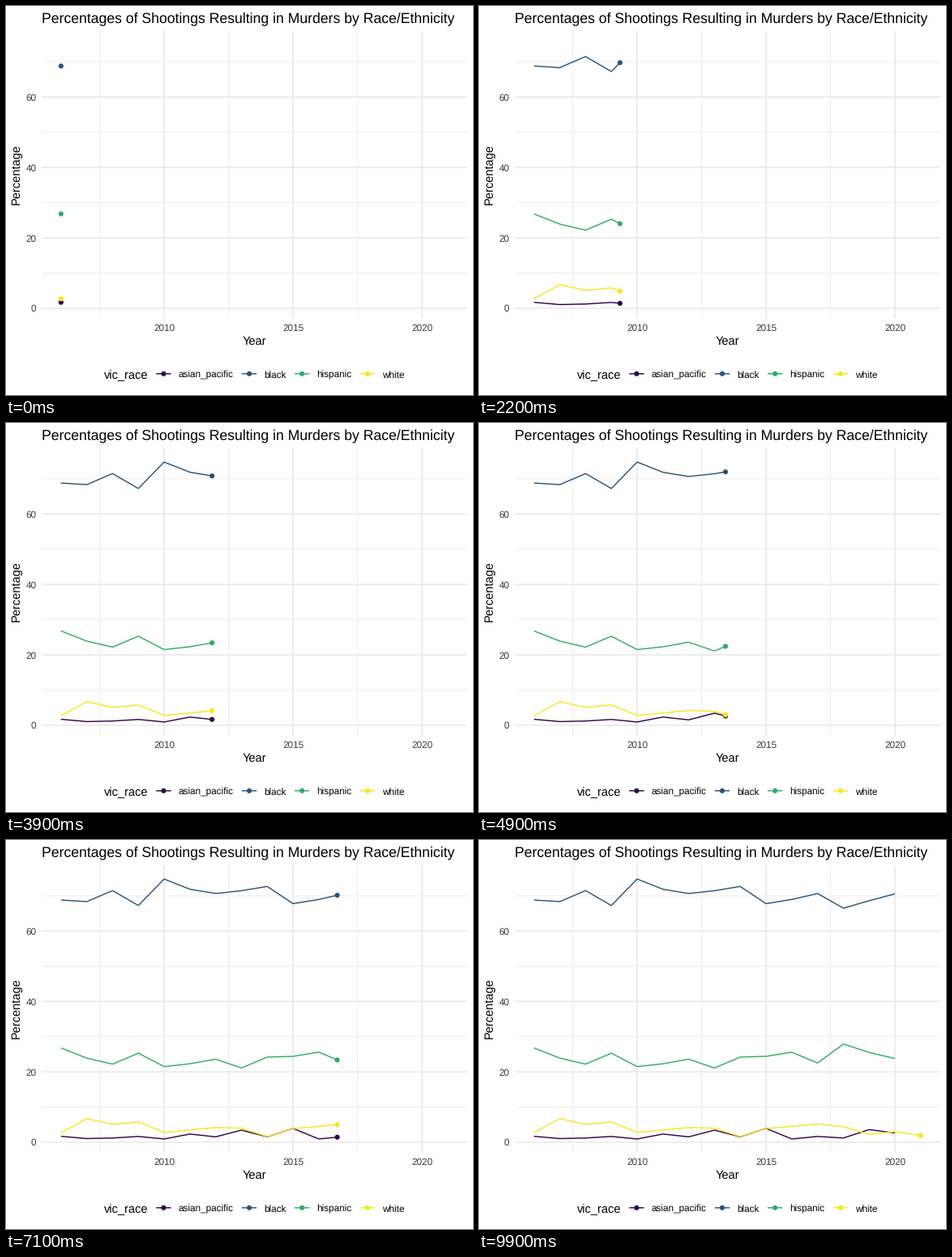
Animation of 576x480 px, one loop 10 s. Source, as a matplotlib script:

```python
import matplotlib.pyplot as plt
import numpy as np
from matplotlib.animation import FuncAnimation
from matplotlib.patches import Circle

plt.rcParams.update({"font.family": "Liberation Sans", "text.hinting": "none"})

W, H, DPI = 576, 480, 96
FRAMES, INTERVAL = 100, 100
PX = 72 / DPI  # points per pixel
LEFT, RIGHT, TOP, BOTTOM = 44.0, 568.67, 30.9, 385.4
GRID, TICK_TEXT = "#E6E6E6", "#3C3C3C"
LINE_W, DOT_R = 1.42, 3.08
TITLE_PT, AXIS_PT, SMALL_PT = 13.2, 11, 8.8

FIRST, LAST = 2006, 2021
years = np.arange(FIRST, LAST + 1)


def shares():
    """Yearly percentages; only one group reaches the last year."""
    white = np.array([2.7, 6.7, 5.1, 5.8, 2.8, 3.5, 4.2, 4.0,
                      1.6, 3.9, 4.5, 5.2, 4.4, 2.3, 3.0, 1.9])
    hispanic = np.array([26.8, 23.9, 22.2, 25.3, 21.5, 22.3, 23.6, 21.1,
                         24.2, 24.4, 25.6, 22.5, 27.9, 25.5, 23.8])
    # A small ripple with a few surge years
    yr = years[:-1]
    asian = (1.3 + 0.4 * np.cos(2 * np.pi * (yr - FIRST) / 2.8)
             + 2.55 * np.isin(yr, (2013, 2015, 2019))
             + 0.95 * np.isin(yr, (2011, 2020)))
    black = 100 - hispanic - white[:-1] - asian
    return {"asian_pacific": asian, "black": black,
            "hispanic": hispanic, "white": white}


COLORS = {"asian_pacific": "#330045", "black": "#26547B",
          "hispanic": "#2FAC67", "white": "#FCE41E"}


def x_of(year):
    return LEFT + (RIGHT - LEFT) * ((year - FIRST) / (LAST - FIRST) / 1.1 + 0.5 / 11)


def y_of(pct):
    return 373.0 - 4.345 * np.asarray(pct)


fig = plt.figure(figsize=(W / DPI, H / DPI), dpi=DPI, facecolor="white")
ax = fig.add_axes([0, 0, 1, 1])
ax.set(xlim=(0, W), ylim=(H, 0))
ax.axis("off")


def stroke(xs, ys, color, width, z):
    return ax.plot(xs, ys, color=color, lw=width * PX, zorder=z, snap=False,
                   solid_capstyle="butt", solid_joinstyle="round")[0]


def dot(x, y, color, z):
    return ax.add_patch(Circle((x, y), DOT_R, fc=color, lw=0, zorder=z))


def label(x, y, text, size, color="black", ha="left", **kw):
    return ax.text(x, y, text, fontsize=size, color=color, ha=ha,
                   va="baseline", **kw)


def h_grid(pct, width, z):
    stroke([LEFT, RIGHT], [y_of(pct)] * 2, GRID, width, z)


def v_grid(year, width, z):
    stroke([x_of(year)] * 2, [TOP, BOTTOM], GRID, width, z)


# Grid and axes
for pct in range(0, 80, 20):
    h_grid(pct + 10, LINE_W / 2, 1)
    h_grid(pct, LINE_W, 2)
    label(37.5, y_of(pct) + 4.3, str(pct), SMALL_PT, TICK_TEXT, "right")
for year in range(2010, 2025, 5):
    v_grid(year - 2.5, LINE_W / 2, 1)
    v_grid(year, LINE_W, 2)
    label(x_of(year), 401, str(year), SMALL_PT, TICK_TEXT, "center")

mid_x, mid_y = (LEFT + RIGHT) / 2, (TOP + BOTTOM) / 2
label(LEFT, 20, "Percentages of Shootings Resulting in Murders by Race/Ethnicity", TITLE_PT)
label(mid_x, 418, "Year", AXIS_PT, ha="center")
label(16.5, mid_y - 1, "Percentage", AXIS_PT, ha="center",
      rotation=90, rotation_mode="anchor")

# Legend, laid out from left to right
label(120.9, 460, "vic_race", AXIS_PT)
key_x, key_y = 194.4, 453.8
for name, color in COLORS.items():
    stroke([key_x - 9.2, key_x + 9.2], [key_y] * 2, color, LINE_W, 3)
    dot(key_x, key_y, color, 4)
    text = label(key_x + 18, 459, name, SMALL_PT)
    key_x += 18 + text.get_window_extent().width + 19.7

# Every year lands on a whole frame, with linear motion between
stops = np.round(np.linspace(0, FRAMES - 1, len(years)))

tracks = []
for i, (name, vals) in enumerate(shares().items()):
    line = stroke([], [], COLORS[name], LINE_W, 5 + i / 10)
    head = dot(0, 0, COLORS[name], 6 + i / 10)
    tracks.append((line, head, x_of(years[:len(vals)]), y_of(vals)))


def draw(frame):
    artists = []
    for line, head, xs, ys in tracks:
        at = stops[:len(xs)]
        x, y = np.interp(frame, at, xs), np.interp(frame, at, ys)
        past = at < frame
        line.set_data(np.append(xs[past], x), np.append(ys[past], y))
        head.center = x, y
        head.set_visible(bool(frame <= at[-1]))
        artists += [line, head]
    return artists


anim = FuncAnimation(fig, draw, frames=FRAMES, interval=INTERVAL,
                     repeat=True, repeat_delay=0)
plt.show()
```
